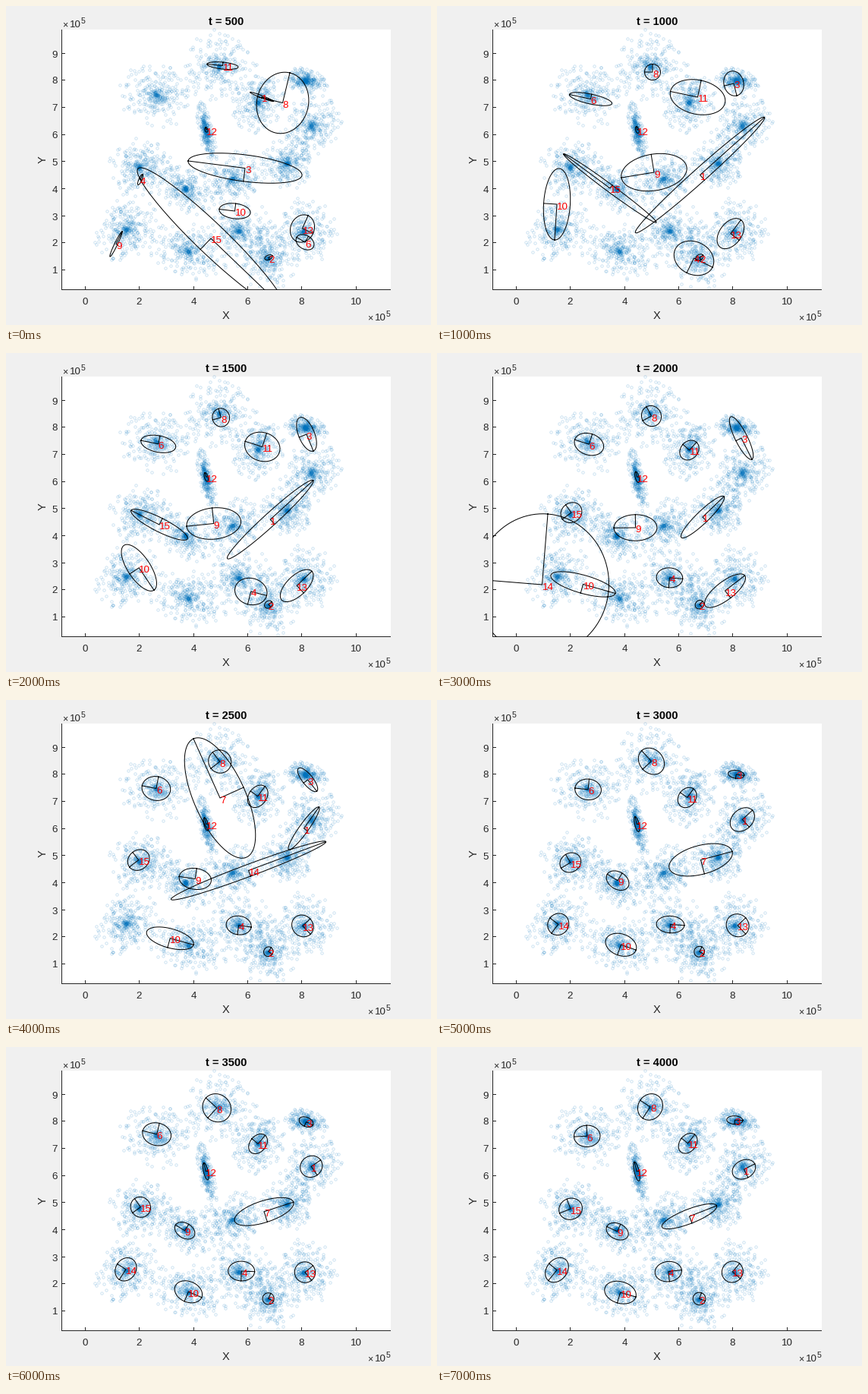
A matplotlib script for the animation above (8 s loop, 560 by 420 pixels).

```python
import numpy as np
import matplotlib.pyplot as plt
from matplotlib.animation import FuncAnimation
from matplotlib.patches import Rectangle

W, H, DPI = 560, 420, 100
PX = 72 / DPI                      # points per pixel
LEFT, RIGHT, TOP, BOTTOM = 73, 507, 31, 374
STEPS = 8
INK = (0.15, 0.15, 0.15)
BLUE = "#0072BD"

# Clusters by label: centre, spread along and across, tilt in degrees
CLUSTERS = {
    1: (402 + 158j, 17, 14, -40), 2: (345 + 332j, 16, 16, -90),
    3: (394 + 98j, 11, 6, 12), 4: (307 + 296j, 18, 14, -4),
    5: (370 + 207j, 15, 12, 0), 6: (199 + 117j, 19, 16, 190),
    7: (299 + 227j, 17, 14, -15), 8: (281 + 79j, 18, 18, 135),
    9: (237 + 241j, 16, 11, 205), 10: (240 + 323j, 21, 14, 15),
    11: (332 + 127j, 12, 16, 217), 12: (263 + 164j, 15, 3.5, 257),
    13: (392 + 297j, 16, 16, -40), 14: (158 + 294j, 18, 14, 125),
    15: (176 + 212j, 16, 14, 150),
}

# Ellipses by label: step of arrival at the cluster, then the poses before it
# as (step, centre, first radius, length of second radius)
PATHS = {
    8: (5, (0, 364.5 + 127.5j, 9.5 - 39.5j, -34), (1, 284 + 87j, -10.5, 10.5)),
    11: (3, (0, 285.5 + 78.5j, -20.5 - 2j, 4.5),
         (1, 343.5 + 120j, -36 - 7.5j, 22.5)),
    3: (5, (0, 315 + 213.5j, -75 - 9.5j, -17.5), (1, 391 + 102j, 4 + 16j, 13),
        (3, 401 + 112j, 14 + 28j, 8)),
    6: (3, (0, 394 + 311j, -11 - 6.5j, 9), (1, 202.5 + 122.5j, -28 - 6j, 6.5)),
    12: (8, (0, 264 + 163j, -1 - 3j, 2)),
    1: (5, (0, 337 + 119.5j, 15.5 + 6j, 1.5), (1, 346.5 + 222.5j, 85 - 76j, 9),
        (3, 350 + 216j, 28 - 27j, 8), (4, 392.5 + 169j, 20 - 28j, 6)),
    15: (3, (0, 270 + 306j, 96 + 92j, 20), (1, 228 + 240j, -61 - 45j, 5)),
    9: (5, (0, 145 + 313.5j, 8 - 16.5j, 2), (1, 286 + 219j, -43 + 7j, 24)),
    10: (5, (0, 301.5 + 270j, -20.5 - 2.5j, 10), (1, 158 + 261j, -3 + 47j, 17.5),
         (3, 192.5 + 304.5j, 42.5 + 12j, 12)),
    4: (3, (0, 177 + 228.5j, 3 - 7j, 2), (1, 338.5 + 332j, 24.5 + 12j, 21.5)),
    13: (4, (0, 390.5 + 293j, 7.5 - 17j, 15.5), (3, 379.5 + 313j, 26 - 20j, 12)),
    2: (16, (0, 346 + 331j, 5 - 2j, 3)),
    14: (5, (3, 138.5 + 305j, 7.5 - 93j, -88), (4, 319.5 + 224.5j, 102 - 38j, 8)),
    7: (9, (4, 282 + 129j, -35 - 78j, 34), (5, 347.5 + 210.5j, 41.5 - 11j, 19),
        (7, 332.5 + 223j, 36 - 14j, 9.5)),
}

plt.rcParams["font.family"] = "Liberation Sans"
fig = plt.figure(figsize=(W / DPI, H / DPI), dpi=DPI, facecolor="#f0f0f0")
ax = fig.add_axes([0, 0, 1, 1])
ax.set_xlim(0, W)
ax.set_ylim(H, 0)
ax.axis("off")


def write(x, y, s, size, **kw):
    kw.setdefault("color", INK)
    return ax.text(x, y, s, fontsize=size * PX, **kw)


def line(xs, ys):
    ax.plot(xs, ys, color=INK, lw=PX, solid_capstyle="butt", snap=False,
            zorder=3)


def draw_axes():
    ax.add_patch(Rectangle((LEFT, TOP), RIGHT - LEFT, BOTTOM - TOP,
                           fc="white", ec="none", zorder=0))
    line([LEFT + .5] * 2, [TOP, BOTTOM])
    line([LEFT, RIGHT], [BOTTOM - .5] * 2)
    for k in range(0, 11, 2):
        x = int(104.5 + 35.67 * k) + .5
        line([x, x], [BOTTOM, BOTTOM - 5])
        write(x, 393, str(k), 13.33, ha="center")
    for k in range(1, 10):
        y = int(383.2 - 35.67 * k) + .5
        line([LEFT, LEFT + 5], [y, y])
        write(68, y + 5, str(k), 13.33, ha="right")
    write(290, 412, "X", 14.67, ha="center")
    write(48.5, 202, "Y", 14.67, ha="center", va="center", rotation=90)
    for x, y in ((74, 28), (476, 414)):
        write(x, y, "×", 12.5)
        write(x + 9.5, y, "10", 13.33)
        write(x + 25, y - 5, "5", 10.5)


def turn(deg):
    return np.exp(1j * np.radians(deg))


def draw_points():
    rng = np.random.default_rng(4)
    for centre, along, across, tilt in CLUSTERS.values():
        r = 2.8 * rng.beta(1, 1.5, 333)
        a = rng.uniform(0, 2 * np.pi, 333)
        z = centre + r * (along * np.cos(a) + 1j * across * np.sin(a)) * turn(tilt)
        ax.plot(z.real, z.imag, "o", ms=3.4 * PX, mfc="none", mec=BLUE,
                mew=0.75 * PX, alpha=0.25, zorder=1)


def pose(n, step):
    """Centre, first radius and second radius' length of ellipse n."""
    arrival, *keys = PATHS[n]
    centre, along, across, tilt = CLUSTERS[n]
    if step >= arrival:
        # once settled, it only trembles around its cluster
        dx, dy, da, db, turned = np.random.default_rng([n, step]).normal(size=5)
        centre += 1.5 * (dx + 1j * dy)
        along *= 1 + 0.07 * da
        across *= 1 + 0.07 * db
        tilt += 6 * turned
    rest = (centre, 0.95 * along * turn(tilt), 0.95 * across)
    steps, *columns = zip(*keys, (arrival, *rest))
    return [np.interp(step, steps, column) for column in columns]


PHI = np.linspace(0, 2 * np.pi, 101)


def outline(c, u, w):
    v = 1j * w * u / abs(u)
    ring = c + u * np.cos(PHI) + v * np.sin(PHI)
    return [*ring, np.nan, c + u, c, c + v, np.nan]


draw_axes()
draw_points()
box = Rectangle((LEFT, TOP), RIGHT - LEFT, BOTTOM - TOP, transform=ax.transData)
curves, = ax.plot([], [], color="black", lw=PX, zorder=4)
curves.set_clip_path(box)
title = write(290, 24.7, "", 14.67, ha="center", weight="bold", color="black")
labels = {n: write(0, 0, str(n), 13.33, color="red", zorder=5) for n in PATHS}


def update(step):
    title.set_text(f"t = {500 * (step + 1)}")
    path = []
    for n, label in labels.items():
        first_step = PATHS[n][1][0]
        label.set_visible(step >= first_step)
        if step >= first_step:
            c, u, w = pose(n, step)
            label.set_position((c.real, c.imag + 6.5))
            path += outline(c, u, w)
    path = np.array(path)
    gap = np.isnan(path)
    curves.set_data(np.where(gap, np.nan, path.real),
                    np.where(gap, np.nan, path.imag))
    return [title, curves, *labels.values()]


anim = FuncAnimation(fig, update, frames=STEPS, interval=1000,
                     repeat=True, repeat_delay=0, blit=False)
plt.show()
```
